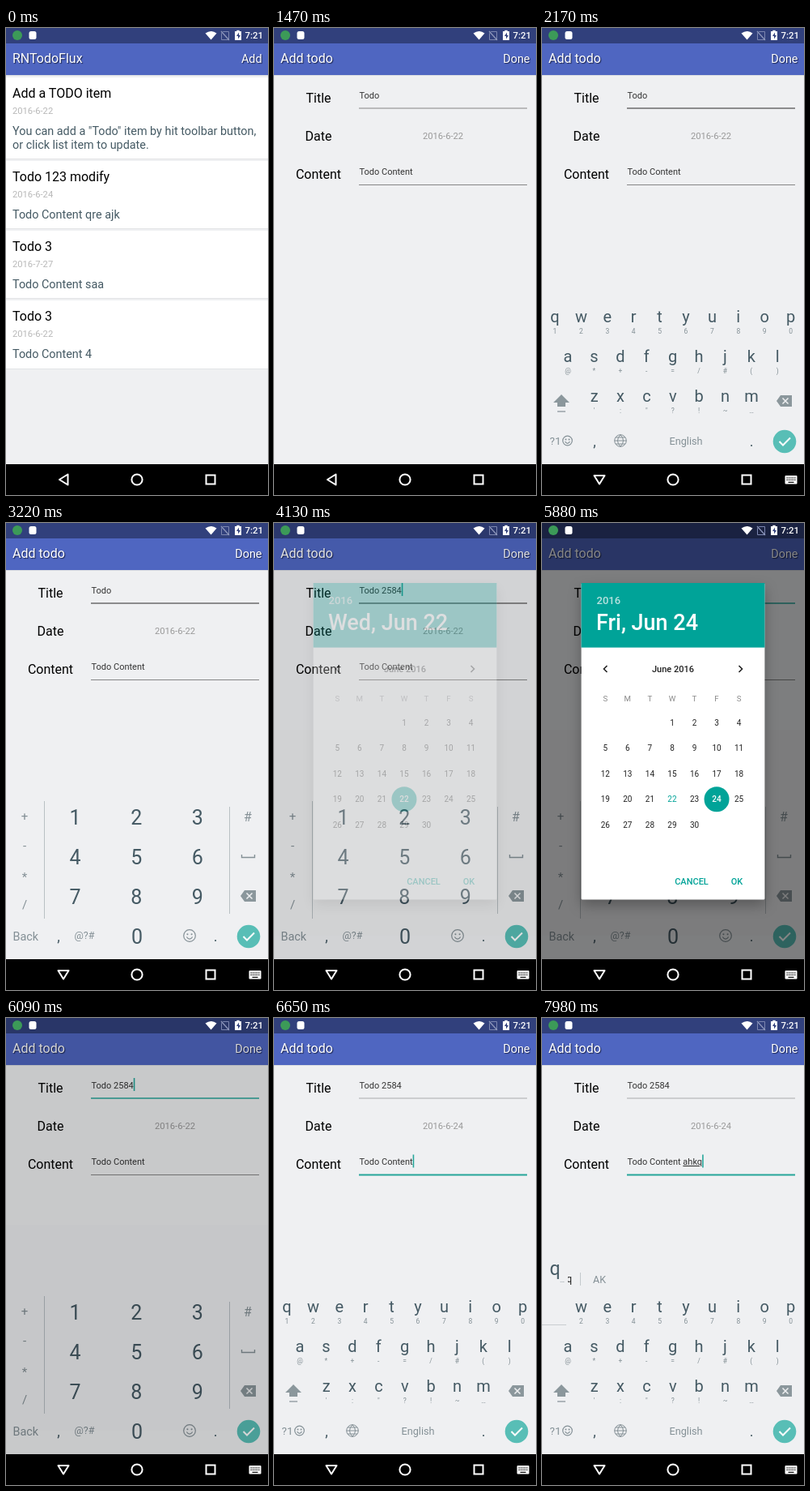
Recreate the animation shown at these times as an HTML page. Size 324 by 576 pixels, loop 8 s.

```html
<!DOCTYPE html>
<html lang="en">
<head>
<meta charset="utf-8">
<title>Todo app</title>
<style>
html, body { margin: 0; width: 100%; height: 100%; overflow: hidden; background: #000; }
svg { display: block; width: 324px; height: 576px; font-family: Roboto, sans-serif; }
text { white-space: pre; }
.mid { text-anchor: middle; }
.end { text-anchor: end; }
.med { font-weight: 500; }
.bar { text-shadow: 1px 1px 1px #1c2550; }
.line { fill: none; stroke-width: 2; }
.sheet { filter: drop-shadow(0 7px 8px rgba(0, 0, 0, .28)); }
</style>
</head>
<body>
<svg id="stage" viewBox="0 0 324 576"></svg>
<script>
const BG = '#eff0f2', KEY = '#455a64', SOFT = '#849096', TEAL = '#00a398', ACCENT = '#26a69a';

const text = (x, y, str, size, fill, cls = '', more = '') =>
  `<text x="${x}" y="${y}" font-size="${size}" fill="${fill}" class="${cls}" ${more}>${str}</text>`;
const mid = (x, y, str, size, fill, cls = '', more = '') => text(x, y, str, size, fill, 'mid ' + cls, more);
const rect = (x, y, w, h, fill, more = '') =>
  `<rect x="${x}" y="${y}" width="${w}" height="${h}" fill="${fill}" ${more}/>`;
const circle = (x, y, r, fill, more = '') => `<circle cx="${x}" cy="${y}" r="${r}" fill="${fill}" ${more}/>`;
const path = (d, stroke, width = 1.2, fill = 'none', more = '') =>
  `<path d="${d}" stroke="${stroke}" stroke-width="${width}" fill="${fill}" ${more}/>`;
const group = (id, body) => `<g id="${id}">${body}</g>`;

const toolbar = (title, action) =>
  rect(0, 19, 324, 39, '#4f66c1') + rect(0, 58, 324, 1, '#dcdee2') +
  text(8, 43, title, 16, '#fff', 'bar') + text(316.5, 43, action, 14.4, '#fff', 'end bar');

const item = (top, height, title, date, lines) =>
  rect(0, top, 324, height, '#fff') + rect(0, top + height, 324, 1, '#e3e4e6') +
  text(8, top + 25, title, 16, '#000') + text(8, top + 45, date, 11.2, '#b8b8b8') +
  lines.map((s, i) => text(8, top + 71 + 17 * i, s, 14.4, KEY)).join('');

const listScene = rect(0, 19, 324, 519, BG) + toolbar('RNTodoFlux', 'Add') +
  item(61, 100, 'Add a TODO item', '2016-6-22',
    ['You can add a "Todo" item by hit toolbar button,', 'or click list item to update.']) +
  item(164, 83, 'Todo 123 modify', '2016-6-24', ['Todo Content qre ajk']) +
  item(250, 83, 'Todo 3', '2016-7-27', ['Todo Content saa']) +
  item(336, 84, 'Todo 3', '2016-6-22', ['Todo Content 4']);

const formScene = rect(0, 19, 324, 519, BG) + toolbar('Add todo', 'Done') +
  ['Title', 'Date', 'Content'].map((s, i) => mid(55, 92 + 47 * i, s, 16, '#000')).join('') +
  text(105.5, 86.5, 'Todo', 11, '#333', '', 'id="title"') +
  mid(209, 137, '2016-6-22', 11.2, '#999', '', 'id="date"') +
  text(105.5, 181, 'Todo Content<tspan id="typed"></tspan><tspan id="word" text-decoration="underline"></tspan>',
    11, '#333', '', 'id="content"') +
  '<path id="titleLine" d="M105 99H313"/><path id="contentLine" d="M105 193.5H313"/>' +
  rect(0, 74, 1.6, 16, ACCENT, 'id="cursor"');

const smiley = (x, y, r) => circle(x, y, r, 'none', `stroke="${SOFT}" stroke-width="1.2"`) +
  circle(x - r * .35, y - r * .25, 1, SOFT) + circle(x + r * .35, y - r * .25, 1, SOFT) +
  path(`M${x - r * .5} ${y + r * .2}q${r * .5} ${r * .75} ${r} 0`, SOFT);

const sharedKeys =
  path('M290 460l5-7h14v14h-14z', 'none', 0, '#8b979c') + path('M297.5 456.5l7 7m0-7l-7 7', BG, 1.5) +
  mid(65, 516, ',', 18, KEY) + mid(259, 516, '.', 18, KEY) +
  circle(300, 510, 14.3, '#58beb6') + path('M293.5 510l4.5 4.5 9-9', '#fff', 2);

const numberKeys = path('M47.5 343V488M276.5 350V482', '#b9c0c4', 1) +
  [...'1234567890'].map((d, i) =>
    mid(i === 9 ? 162 : 85.5 + 75.7 * (i % 3), 371.5 + 49 * Math.floor(i / 3), d, 25, KEY)).join('') +
  [...'+-*/'].map((s, i) => mid(23, 367 + 36.2 * i + (s === '*' ? 3 : 0), s, 15, SOFT)).join('') +
  mid(299, 368, '#', 16, SOFT) + path('M291.5 409v3.5h16V409', SOFT, 1.4) +
  text(8.5, 515, 'Back', 14.4, SOFT) + mid(97, 513, '@?#', 12.6, SOFT) + smiley(227, 509, 7.3) + sharedKeys;

const rows = [
  { letters: 'qwertyuiop', marks: '1234567890', x: 16, y: 363 },
  { letters: 'asdfghjkl', marks: '@*+-=/#()', x: 32, y: 412 },
  { letters: 'zxcvbnm', marks: '\':"?!~…', x: 64.6, y: 461 }
];
const keyAt = {};
const letterKeys = rows.map(row => [...row.letters].map((c, i) => {
  const x = row.x + 32.4 * i;
  keyAt[c] = { x, y: row.y };
  return mid(x, row.y, c, 20, KEY) + mid(x, row.y + 14, row.marks[i], 8.5, SOFT);
}).join('')).join('') +
  path('M24 452l10 10h-5v5h-10v-5h-5z', 'none', 0, '#8b979c') + path('M19 473h10', '#8b979c', 1.3) +
  text(9.5, 514, '?1', 13.5, SOFT) + smiley(31.5, 509, 5.8) +
  circle(97, 509, 7.3, 'none', `stroke="${SOFT}"`) +
  path('M89.7 509h14.6M91 505h12M91 513h12M97 501.7q-7 7.3 0 14.6q7-7.3 0-14.6', SOFT, 1) +
  mid(178, 514, 'English', 12.7, SOFT) + sharedKeys +
  group('strip', mid(24, 326, '', 12, '#222', '', 'id="guess"') + path('M47.5 314v16', '#c3c9cc', 1) +
    mid(71, 326.5, 'AK', 12.5, SOFT)) +
  group('popup', rect(-17, -68, 33, 84, BG) + path('M-16 15.5H14', '#c9cdd0', 1) +
    mid(0, -46, '', 23, KEY, '', 'id="popKey"') + mid(9, -37, '…', 9, SOFT));

const dayAt = d => ({ x: 78.3 + 27.55 * ((d + 2) % 7), y: 246 + 31.6 * Math.floor((d + 2) / 7) });
const days = Array.from({ length: 30 }, (_, i) => {
  const { x, y } = dayAt(i + 1);
  return mid(x, y + 3.6, i + 1, 10, '#222', '', `id="day${i + 1}"`);
}).join('');

const dialog = rect(48.6, 74, 226.8, 390.4, '#fff', 'class="sheet" rx="1.5"') +
  rect(48.6, 74, 226.8, 79.6, TEAL) +
  text(67.5, 100, '2016', 13, '#b8e2df', 'med') + text(67, 132, '', 27, '#fff', 'med', 'id="heading"') +
  path('M80.5 176l-4 4 4 4M243.5 176l4 4-4 4', '#222', 1.6) + mid(162, 184, 'June 2016', 11, '#222', 'med') +
  [...'SMTWTFS'].map((s, i) => mid(78.3 + 27.55 * i, 219.5, s, 9.7, '#8a8a8a')).join('') +
  circle(0, 0, 15.5, TEAL, 'id="picked"') + days +
  mid(185, 446, 'CANCEL', 11, TEAL, 'med') + mid(241, 446, 'OK', 11, TEAL, 'med');

const statusIcons = circle(14, 9, 6, '#3c9a58') +
  rect(28.5, 4, 9, 10, '#fff', 'rx="2.5"') +
  path('M246.5 6.5q7-5 14 0l-7 8z', 'none', 0, '#fff') +
  path('M268.5 4.5h7v10h-9v-8z', '#7c86b0', 1) + path('M266 4l10 11', '#8f98bc', 1.2) +
  rect(283, 4, 8, 11, '#fff') + rect(285.3, 2.8, 3.4, 2, '#fff') +
  path('M288 5.5l-3 4.5h2v3.5l3-4.5h-2z', 'none', 0, '#31407c') +
  text(295.5, 13.3, '7:21', 11.4, '#fff', 'med');

const navBar = rect(0, 538, 324, 38, '#000') +
  '<path id="back" class="line" stroke="#fff" stroke-linejoin="round"/>' +
  circle(162, 557, 6.6, 'none', 'stroke="#fff" stroke-width="2"') +
  rect(247.5, 551.5, 11, 11, 'none', 'stroke="#fff" stroke-width="2"') +
  group('imeIcon', rect(300.5, 552, 15, 10.5, '#fff', 'rx="1"') +
    path('M302.5 554.8h11M302.5 557.4h11', '#000', 1.2, 'none', 'stroke-dasharray="1.3 1.1"') +
    path('M304.5 560.3h7', '#000', 1.2));

const stage = document.getElementById('stage');
stage.innerHTML = group('list', listScene) + group('form', formScene) +
  group('keyboard', rect(0, 306, 324, 232, BG) + group('letters', letterKeys) + group('numbers', numberKeys)) +
  rect(0, 0, 324, 19, '#31407c') +
  group('dim', rect(0, 0, 324, 538, '#000') + rect(0, 306, 324, 32, '#000', 'opacity=".2"')) +
  statusIcons + group('dialog', dialog) + navBar;

const el = {};
stage.querySelectorAll('[id]').forEach(node => el[node.id] = node);

const set = (id, attrs) => { for (const k in attrs) el[id].setAttribute(k, attrs[k]); };
const show = (id, on) => set(id, { visibility: on ? 'inherit' : 'hidden' });
const write = (id, str) => { if (el[id].textContent !== str) el[id].textContent = str; };
const within = (t, a, b) => t >= a && t < b;
const ramp = (t, a, b) => Math.min(1, Math.max(0, (t - a) / (b - a)));
// Value of the last [time, value] pair already reached.
const at = (t, steps) => steps.reduce((v, [time, next]) => t >= time ? next : v, steps[0][1]);

function draw(t) {
  const p = ramp(t, 910, 1470), slide = 1 - (1 - p) ** 2.4;
  set('list', { transform: `translate(${-97 * slide} 0)` });
  set('form', { transform: `translate(${324 * (1 - slide)} 0)` });
  show('list', slide < 1);
  show('form', slide > 0);

  const rise = ramp(t, 1610, 1960);
  set('keyboard', { opacity: rise, transform: `translate(0 ${60 * (1 - rise) ** 2})` });
  const ime = t >= 1750, numeric = within(t, 2730, 6580);
  show('letters', !numeric);
  show('numbers', numeric);
  show('imeIcon', ime);
  set('back', { d: ime ? 'M64.5 552h13l-6.5 10.5z' : 'M76.5 550.5v13l-10.5-6.5z' });

  write('title', at(t, [[0, 'Todo'], [2170, 'Todo '], [3290, 'Todo 2'], [3430, 'Todo 25'],
    [3570, 'Todo 258'], [3710, 'Todo 2584']]));
  write('date', t < 6160 ? '2016-6-22' : '2016-6-24');
  write('typed', t < 7280 ? '' : ' ');
  const word = at(t, [[0, ''], [7420, 'a'], [7560, 'ah'], [7770, 'ahk'], [7980, 'ahkq']]);
  write('word', word);
  write('guess', word);
  show('strip', word !== '');

  const press = at(t, [[0, ''], [7420, 'a'], [7490, ''], [7560, 'h'], [7630, ''], [7770, 'k'],
    [7840, ''], [7910, 'q']]);
  show('popup', press !== '');
  if (press) {
    set('popup', { transform: `translate(${keyAt[press].x} ${keyAt[press].y})` });
    write('popKey', press);
  }

  const inContent = t >= 6580;
  const titleColor = at(t, [[0, '#868686'], [1750, '#6b6b6b'], [4830, ACCENT], [6580, '#a9abad']]);
  set('titleLine', { stroke: titleColor, 'stroke-width': within(t, 1750, 6580) ? 1.7 : 1.2 });
  set('contentLine', { stroke: inContent ? ACCENT : '#868686', 'stroke-width': inContent ? 2 : 1.2 });
  const blink = at(t, [[0, false], [1750, true], [2170, false], [2660, true], [3220, false],
    [3290, true], [7070, false], [7280, true]]);
  show('cursor', blink && slide === 1);
  const field = inContent ? 'content' : 'title';
  set('cursor', { x: 105.5 + el[field].getComputedTextLength(), y: inContent ? 168.5 : 74 });

  const opening = t < 5880;
  set('dialog', { opacity: opening ? ramp(t, 4060, 4340) : 1 - ramp(t, 5880, 6090) });
  set('dim', { opacity: .48 * (opening ? ramp(t, 4060, 4340) : 1 - ramp(t, 5880, 6200)) });
  const day = t < 4830 ? 22 : 24, spot = dayAt(day);
  write('heading', day === 22 ? 'Wed, Jun 22' : 'Fri, Jun 24');
  set('picked', { cx: spot.x, cy: spot.y });
  set('day22', { fill: day === 22 ? '#fff' : TEAL, 'font-weight': day === 22 ? 500 : 400 });
  set('day24', { fill: day === 24 ? '#fff' : '#222', 'font-weight': day === 24 ? 500 : 400 });
}

const LOOP = 8000, STEP = 70;
let last = -1;
function tick() {
  const t = Math.floor(performance.now() % LOOP / STEP) * STEP;
  if (t !== last) draw(last = t);
  requestAnimationFrame(tick);
}
tick();
</script>
</body>
</html>
```
